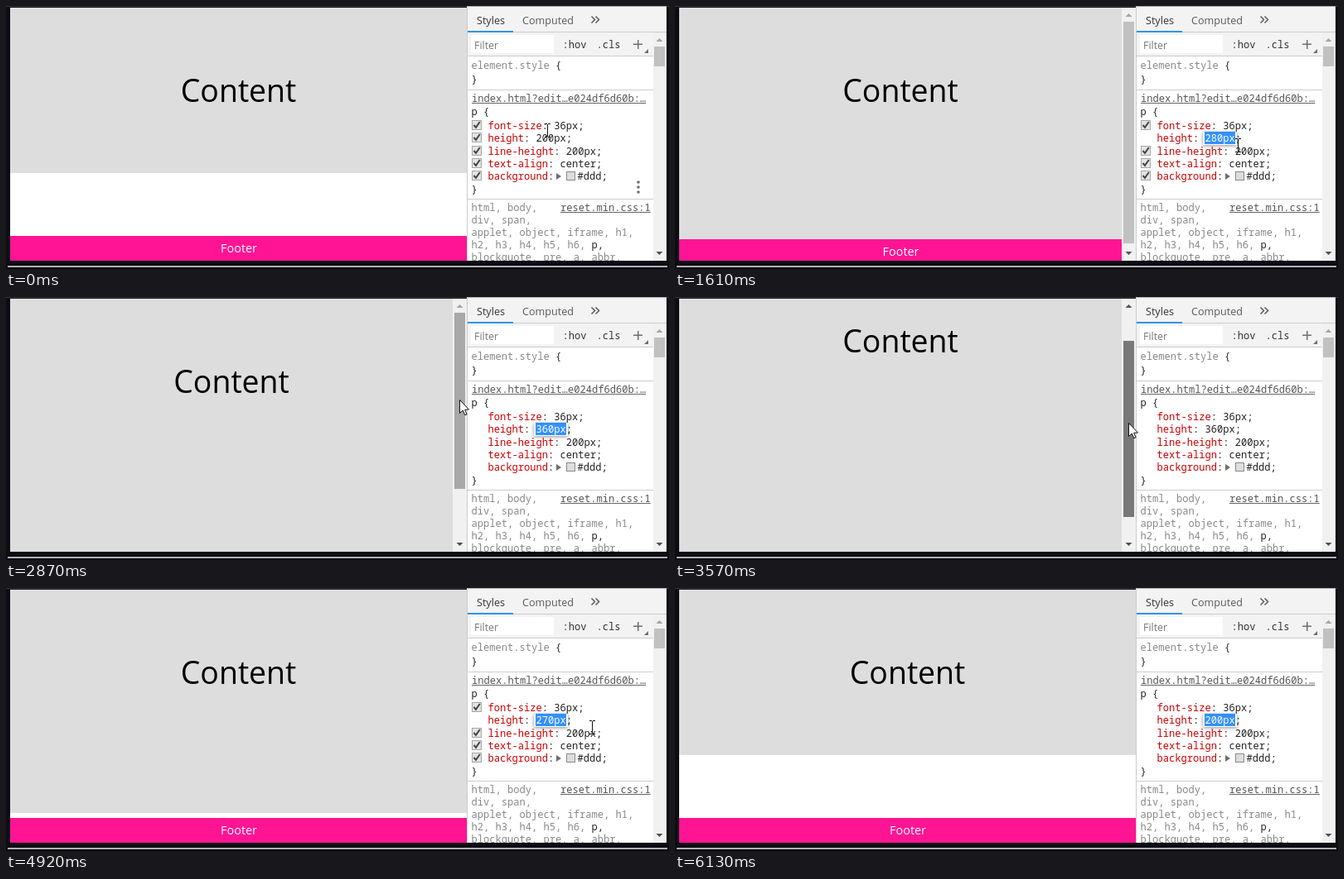
Write an HTML page with a canvas that moves like this. It is 800 by 318 pixels and loops after 6300 ms.

```html
<!DOCTYPE html>
<html lang="en">
<head>
<meta charset="utf-8">
<title>Sticky footer demo</title>
<style>
html, body { margin: 0; width: 100%; height: 100%; overflow: hidden; background: #0c0d14; }
canvas { display: block; width: 800px; height: 318px; }
</style>
</head>
<body>
<canvas id="stage" width="800" height="318"></canvas>
<script>
const ctx = document.getElementById('stage').getContext('2d');
const LOOP = 6300;
const STEP = 77; // screen refresh
const SANS = '"Open Sans", "Noto Sans", sans-serif';
const MONO = '12.08px "Noto Sans Mono", "DejaVu Sans Mono", monospace';
const CHAR = 7.25;
const VIEW = { left: 5, right: 556, top: 2, bottom: 308 };
const BAR = 17;

// Key points of the mouse: time, x, y
const mousePath = [
  [0, 653, 150], [300, 653, 156], [450, 653, 168], [600, 655, 168],
  [760, 677, 169], [980, 679, 168], [2140, 679, 168], [2300, 712, 228],
  [2450, 708, 230], [2830, 547, 124], [3090, 546, 118], [3800, 547, 172],
  [4130, 555, 285], [4280, 557, 283], [4535, 660, 164], [4840, 707, 168],
  [5595, 707, 168], [6000, 775, 308]
];

// Key points of the edited value: time, height
const growth = [[750, 200], [980, 230], [1230, 250], [1530, 270], [1610, 280], [1683, 280], [2300, 360]];
const shrink = [[4613, 360], [4920, 270], [5000, 240], [5080, 230], [5360, 230], [5595, 200]];

function along(keys, t) {
  const i = keys.findIndex(k => k[0] > t);
  if (i < 0) return keys[keys.length - 1].slice(1);
  if (i === 0) return keys[0].slice(1);
  const a = keys[i - 1], b = keys[i];
  const k = (t - a[0]) / (b[0] - a[0]);
  return a.slice(1).map((v, j) => v + (b[j + 1] - v) * k);
}

function heightAt(t) {
  if (t < 4000) return 10 * Math.floor((along(growth, t)[0] + 0.5) / 10);
  return 10 * Math.ceil((along(shrink, t)[0] - 0.5) / 10);
}

function rect(x, y, w, h, color) {
  ctx.fillStyle = color;
  ctx.fillRect(x, y, w, h);
}

function text(str, x, y, color, font = MONO, align = 'left') {
  ctx.font = font;
  ctx.textAlign = align;
  ctx.fillStyle = color;
  ctx.fillText(str, x, y);
}

function trace(points) {
  ctx.beginPath();
  points.forEach(([x, y]) => ctx.lineTo(x, y));
}

function line(points, color, width) {
  trace(points);
  ctx.strokeStyle = color;
  ctx.lineWidth = width;
  ctx.stroke();
}

function poly(points, fill, stroke) {
  trace(points);
  ctx.closePath();
  ctx.fillStyle = fill;
  ctx.fill();
  if (!stroke) return;
  ctx.strokeStyle = stroke;
  ctx.lineWidth = 1;
  ctx.stroke();
}

function clipped(x, y, w, h, paint) {
  ctx.save();
  ctx.beginPath();
  ctx.rect(x, y, w, h);
  ctx.clip();
  paint();
  ctx.restore();
}

function barArrow(x, y, dir, active) {
  poly([[x - 4, y + 2 * dir], [x + 4, y + 2 * dir], [x, y - 2 * dir]], active ? '#505050' : '#a3a3a3');
}

function drawPage(height, mouseY, hover, held) {
  const { left, top, right: edge } = VIEW;
  const view = VIEW.bottom - top;
  const total = Math.max(276, height) + 30;
  const max = total - view;
  const right = edge - (max > 0 ? BAR : 0);
  const mid = (left + right) / 2;
  const track = view - 2 * BAR;
  const scroll = Math.max(0, Math.min(max, Math.round((mouseY - 118) * total / track)));
  const foot = top - scroll + total - 30;

  rect(left, top, edge - left, view, '#fff');
  rect(left, top - scroll, right - left, height, '#ddd');
  text('Content', mid, top - scroll + 114, '#000', '37.4px ' + SANS, 'center');
  rect(left, foot, right - left, 30, '#ff1493');
  text('Footer', mid + 0.5, foot + 20, '#fff', '500 14.4px ' + SANS, 'center');
  if (max <= 0) return;

  rect(right, top, BAR, view, '#f1f1f1');
  const y = Math.round(top + BAR + scroll * track / total);
  rect(right + 2, y, 13, Math.round(track * view / total), held ? '#787878' : hover ? '#a8a8a8' : '#c1c1c1');
  barArrow(right + 8.5, 11, 1, scroll > 0);
  barArrow(right + 8.5, 299, -1, scroll < max);
}

function drawCheck(y) {
  rect(562, y - 6, 12, 12, '#a6a6a6');
  rect(563, y - 5, 10, 10, '#e4e4e4');
  line([[564.5, y], [567, y + 2.8], [571.8, y - 4]], '#444', 2);
}

function link(str, x, y) {
  text(str, x, y, '#555');
  rect(x, y + 1, str.length * CHAR, 1, '#666');
}

function drawTabs() {
  rect(556, 0, 241, 61, '#f3f3f3');
  rect(556, 0, 241, 1, '#aaa');
  rect(556, 31, 241, 1, '#ccc');
  rect(557, 30, 55, 2, '#2f95e8');
  text('Styles', 568, 22, '#333', '12.6px ' + SANS);
  text('Computed', 623, 22, '#5a5a5a', '12.6px ' + SANS);
  for (const x of [706.5, 711.5]) line([[x, 12.5], [x + 4, 16.5], [x, 20.5]], '#5a5a5a', 1.5);
  rect(561, 35, 100, 22, '#fff');
  text('Filter', 565, 52, '#757575', '12.4px ' + SANS);
  text(':hov', 671.5, 51, '#333');
  text('.cls', 712.5, 51, '#333');
  rect(757, 45.5, 11, 1.5, '#6e6e6e');
  rect(762, 41, 1.5, 11, '#6e6e6e');
  poly([[775, 52], [775, 57], [770, 57]], '#6e6e6e');
}

function drawEditBox() {
  ctx.save();
  ctx.shadowColor = 'rgba(0,0,0,.45)';
  ctx.shadowBlur = 4;
  ctx.shadowOffsetY = 1;
  rect(637, 152, 41, 16, '#fff');
  ctx.restore();
  rect(639, 152, 37, 15, '#3390ff');
}

function drawRules(height, editing, hover) {
  const rules = {
    'font-size': '36px', 'height': height + 'px', 'line-height': '200px',
    'text-align': 'center', 'background': '#ddd'
  };
  Object.entries(rules).forEach(([name, value], i) => {
    const y = Math.round(149 + i * 15.3);
    const edit = editing && name === 'height';
    const colon = 581.5 + name.length * CHAR;
    let x = colon + 2 * CHAR;
    text(name, 581.5, y, '#c80000');
    text(':', colon, y, '#222');
    if (name === 'background') {
      poly([[664, y - 8], [664, y], [670, y - 4]], '#6e6e6e');
      rect(676, y - 10, 11, 11, '#888');
      rect(677, y - 9, 9, 9, '#ddd');
      x = 689.5;
    }
    if (edit) drawEditBox();
    text(value, x, y, edit ? '#fff' : '#222');
    text(';', x + value.length * CHAR, y, '#222');
    if (hover && !edit) drawCheck(y - 5);
  });
  if (!hover || editing) return;
  for (const y of [213, 219, 225]) {
    ctx.beginPath();
    ctx.arc(763, y, 1.8, 0, 7);
    ctx.fillStyle = '#6e6e6e';
    ctx.fill();
  }
}

function drawReset() {
  ['html, body,', 'div, span,', 'applet, object, iframe, h1,',
    'h2, h3, h4, h5, h6,', 'blockquote, pre, a, abbr,']
    .forEach((s, i) => text(s, 561.5, 248 + i * 15, '#888'));
  text('p,', 706.5, 293, '#222');
  link('reset.min.css:1', 669, 248);
}

function drawTools(height, editing, hover) {
  rect(556, 0, 241, 308, '#fff');
  drawTabs();
  for (const y of [60, 101, 233]) rect(557, y, 224, 1, '#ccc');
  text('element.style', 561.5, 76, '#888');
  text('{', 663, 76, '#222');
  text('}', 561.5, 93, '#222');
  link('index.html?edit…e024df6d60b:…', 562, 116);
  text('p {', 561.5, 132, '#222');
  drawRules(height, editing, hover);
  text('}', 561.5, 226, '#222');
  clipped(557, 234, 224, 74, drawReset);

  rect(781, 32, 16, 276, '#f1f1f1');
  rect(782, 49, 13, 24, '#c1c1c1');
  barArrow(788.5, 41, 1, false);
  barArrow(788.5, 299, -1, true);
  rect(556, 0, 1, 308, '#ccc');
}

function drawFrame() {
  rect(0, 0, 800, 318, '#0c0d14');
  rect(0, 0, 800, 1, '#38383c');
  rect(2, 314, 796, 2, '#b0b0b0');
}

function beam(x, y) {
  rect(x, y - 7, 1, 15, '#111');
  for (const end of [y - 8, y + 8]) {
    rect(x - 3, end, 3, 1, '#111');
    rect(x + 1, end, 3, 1, '#111');
  }
}

function pointer(x, y) {
  const shape = [[0, 0], [0, 16], [3.7, 12.6], [6.3, 18.3], [8.6, 17.3], [6.2, 11.8], [11, 11.5]];
  poly(shape.map(([a, b]) => [x + 0.5 + a, y + 0.5 + b]), '#fff', '#111');
}

function resizer(x, y) {
  const corner = [[0, 10], [4, 5], [1, 5]];
  const flip = (sx, sy) => corner.map(([a, b]) => [x + 0.5 + a * sx, y + b * sy]);
  const shape = [...flip(1, -1), ...flip(1, 1).reverse(), ...flip(-1, 1), ...flip(-1, -1).reverse()];
  poly(shape, '#fff', '#111');
}

function drawMouse(x, y) {
  if (y > 300) resizer(x, y);
  else if (x < 562 || y > 240) pointer(x, y);
  else beam(x, y);
}

function draw(now) {
  const t = now % LOOP;
  const [x, y] = along(mousePath, Math.floor(t / STEP) * STEP).map(Math.round);
  const editing = (t >= 300 && t < 3090) || t >= 4612;
  const hover = x > 557 && y > 101 && y < 234;
  const held = t >= 3090 && t < 4380;
  // After release the page stays scrolled to its end
  const grip = held ? y : t < 3090 ? 0 : 999;
  drawFrame();
  clipped(VIEW.left, VIEW.top, VIEW.right - VIEW.left, VIEW.bottom - VIEW.top,
    () => drawPage(heightAt(t), grip, x < 556, held));
  drawTools(heightAt(t), editing, hover);
  if (t < 6130) drawMouse(x, y);
}

function tick(now) {
  draw(now);
  requestAnimationFrame(tick);
}
draw(0);
requestAnimationFrame(tick);
</script>
</body>
</html>
```
